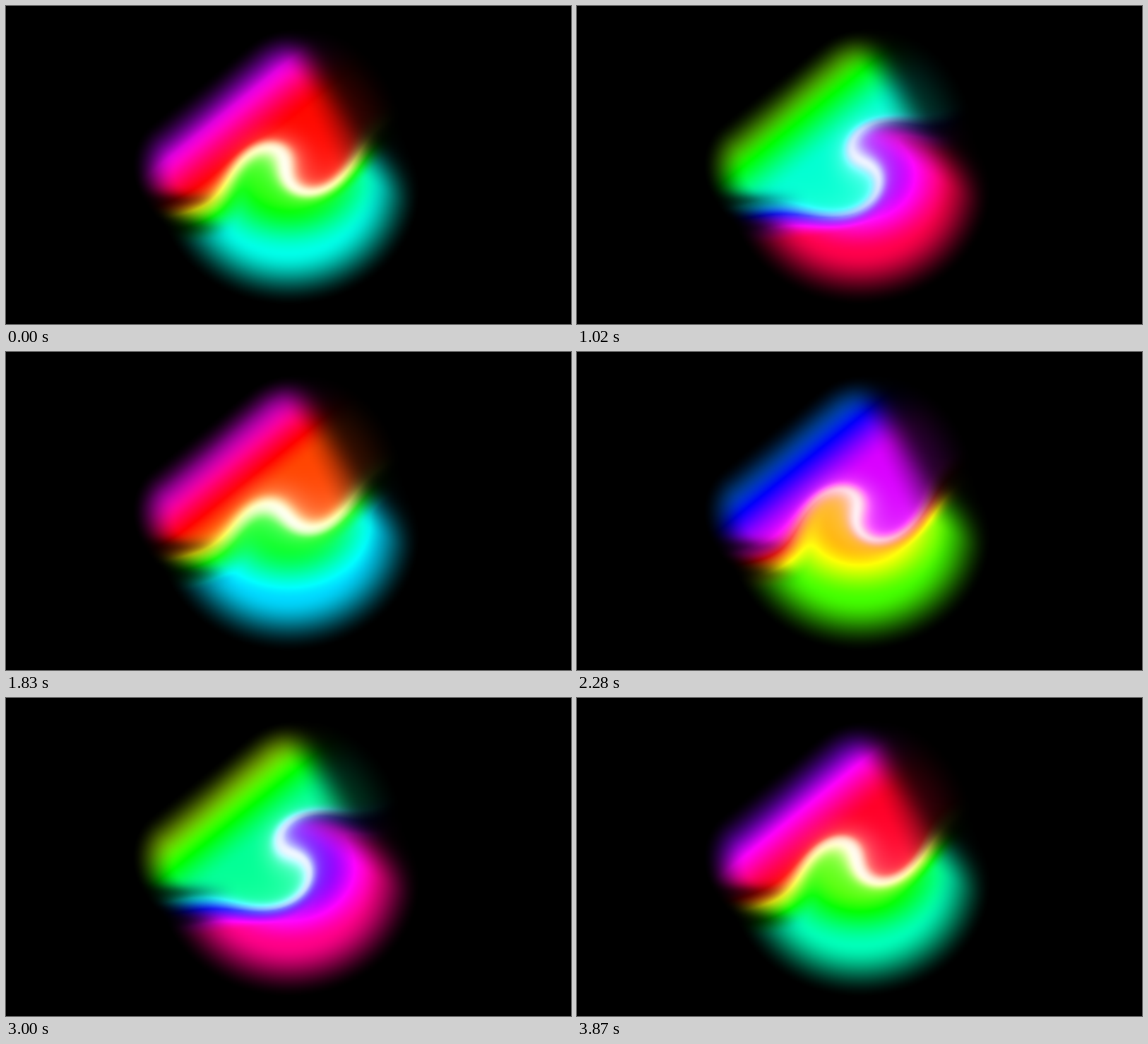
An HTML page with a canvas for the animation above (3900 ms loop, 800 by 450 pixels).

```html
<!DOCTYPE html>
<html lang="en">
<head>
<meta charset="utf-8">
<title>Twisting glow</title>
<style>
  html, body { margin: 0; width: 100%; height: 100%; overflow: hidden; background: #000; }
  canvas { display: block; width: 100vw; height: 100vh; }
</style>
</head>
<body>
<canvas id="glow" width="400" height="225"></canvas>
<script>
const LOOP = 3900, STEP = 30, SCALE = 2;
const CX = 403, CY = 227;
const canvas = document.getElementById('glow');
const ctx = canvas.getContext('2d');
const image = ctx.createImageData(canvas.width, canvas.height);
const data = image.data;

const smooth = (a, b, x) => {
  const k = Math.min(1, Math.max(0, (x - a) / (b - a)));
  return k * k * (3 - 2 * k);
};
const bell = x => Math.exp(-x * x);

// Position relative to the slanted ridge of the upper lobe
const ridgeAlong = (x, y) => (x - 262) * 0.78 - (y - 240) * 0.63;
const ridgeOut = (x, y) => -(x - 262) * 0.63 - (y - 240) * 0.78;

// Darkening beside the left end of the seam
const crease = (x, y, mid) => 1 - 0.55 * bell((y - mid) / 12) * (1 - smooth(240, 330, x));

function upperLight(x, y) {
  const along = ridgeAlong(x, y);
  const beyond = Math.max(0, along - 183, -along * 1.2);
  const ridge = 1 - smooth(22, 94, Math.hypot(Math.max(0, ridgeOut(x, y)), beyond));
  const right = 1 - smooth(-36, 36, (x - 450) * 0.91 - (y - 115) * 0.41);
  const halo = 0.26 * (1 - smooth(0.4, 1, Math.hypot((x - 420) / 150, (y - 200) / 175)));
  const lobe = ridge * right;
  return (lobe + halo * (1 - lobe)) * crease(x, y, 276);
}

function lowerLight(x, y) {
  const body = 1 - smooth(0.7, 1.28, Math.hypot((x - 400) / 148, (y - 255) / 133));
  const notch = smooth(-45, 40, y - 190 - (x - 480) * 0.65);
  return body * (0.1 + 0.9 * notch) * crease(x, y, 314);
}

// Values that stay the same over time, one entry per lit pixel
const cells = [];
for (let py = 0; py < canvas.height; py++) {
  for (let px = 0; px < canvas.width; px++) {
    const i = (py * canvas.width + px) * 4;
    data[i + 3] = 255;
    const x = (px + 0.5) * SCALE, y = (py + 0.5) * SCALE;
    const upper = upperLight(x, y), lower = lowerLight(x, y);
    if (Math.max(upper, lower) < 0.004) continue;
    const dx = x - CX, dy = y - CY, r = Math.hypot(dx, dy);
    cells.push({
      i, dx, dy, upper, lower,
      twist: bell(r / 67),
      core: 0.6 * Math.exp(-((r / 110) ** 3)),
      haze: 0.34 * bell(r / 78),
      upperHue: -66 - 78 * smooth(-35, 70, ridgeOut(x, y)),
      rimHue: 62 * smooth(0.25, 0.85, Math.hypot((x - 400) / 165, (y - 240) / 133))
    });
  }
}

// Signed distance to the untwisted seam, positive below it
function seamDistance(x, y) {
  const bend = x < 0 ? 33 * (x / 170) ** 2 : 0;
  return 0.88 * (y - 9 + 0.55 * x + bend);
}

const channel = (hue, shift) => {
  const k = (((hue + shift) / 60) % 6 + 6) % 6;
  return Math.min(1, Math.max(0, Math.abs(k - 3) - 1));
};

function draw(t) {
  const turn = 140 * Math.PI / 180 * Math.cos(2 * Math.PI * (t / 1950 - 0.1));
  const base = 68 - 0.189 * t;
  for (const c of cells) {
    const a = -turn * c.twist, cos = Math.cos(a), sin = Math.sin(a);
    const d = seamDistance(c.dx * cos - c.dy * sin, c.dx * sin + c.dy * cos);
    const mix = (Math.tanh(d / 14) + 1) / 2;
    const lowerHue = 45 + c.rimHue * smooth(5, 45, d);
    const hue = base + c.upperHue + (lowerHue - c.upperHue) * mix;
    const light = 255 * (c.upper + (c.lower - c.upper) * mix);
    const white = c.core * bell(d / 15) + c.haze * bell(d / 45);
    for (let k = 0; k < 3; k++) {
      const v = channel(hue, -120 * k);
      data[c.i + k] = light * (v + (1 - v) * white);
    }
  }
  ctx.putImageData(image, 0, 0);
}

const start = performance.now();
let shown = -1;
function tick() {
  const t = Math.floor((performance.now() - start) % LOOP / STEP) * STEP;
  if (t !== shown) draw(shown = t);
  requestAnimationFrame(tick);
}
tick();
</script>
</body>
</html>
```
